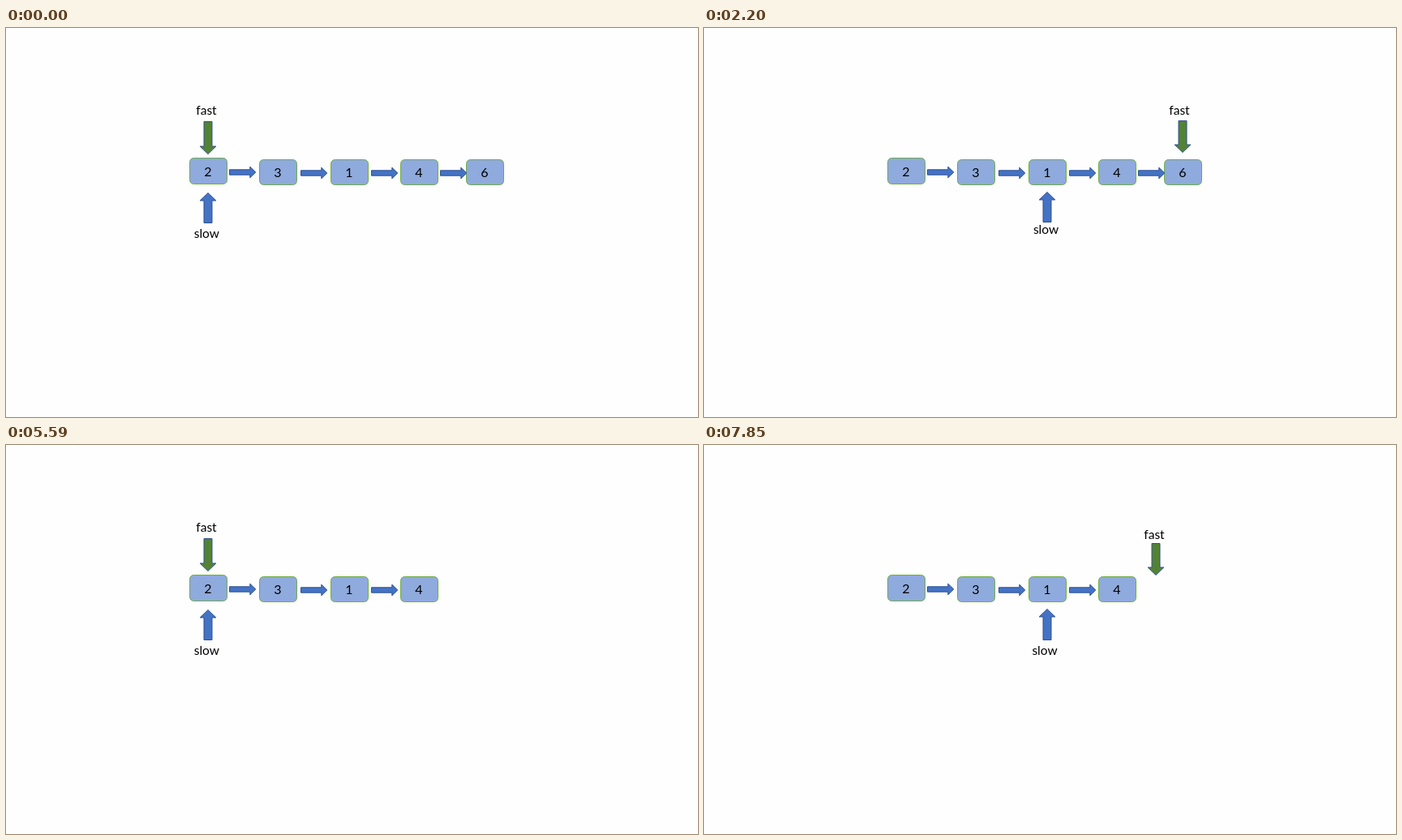
Animation, 853 px wide and 480 px high, one loop 8000 ms. Source, as an HTML page with a canvas:

```html
<!DOCTYPE html>
<html lang="en">
<head>
<meta charset="utf-8">
<title>Fast and slow pointers</title>
<style>
  html, body { margin: 0; width: 100%; height: 100%; overflow: hidden; background: #fefefe; }
  canvas { display: block; width: 853px; height: 480px; }
</style>
</head>
<body>
<canvas id="stage"></canvas>
<script>
const W = 853, H = 480, LOOP = 8000;
const BLUE = '#4472c4', GREEN = '#548235', EDGE = '#2f528f';
const canvas = document.getElementById('stage');
const ctx = canvas.getContext('2d');
const ratio = window.devicePixelRatio || 1;
canvas.width = Math.round(W * ratio);
canvas.height = Math.round(H * ratio);

const nodes = [
  { value: '2', x: 226.5, y: 160.5, h: 32 },
  { value: '3', x: 312.5, y: 162.5, h: 31 },
  { value: '1', x: 400.5, y: 162.5, h: 31 },
  { value: '4', x: 486.5, y: 162.5, h: 31 },
  { value: '6', x: 567.5, y: 162.5, h: 31 }
];
const links = [[275.5, 178], [363.5, 179], [450.5, 179], [535.5, 179]];

// Pointer poses: arrow centre, tail y, tip y, label centre, label baseline
const fastAt = {
  first: [249, 115.5, 155.5, 247, 107],
  third: [423, 114.5, 153.5, 421.3, 107],
  fifth: [590, 114.5, 153.5, 586, 107],
  end: [557, 121.5, 160.5, 555, 116]
};
const slowAt = {
  first: [249, 240.5, 203.5, 247.3, 259],
  second: [336, 240.5, 203.5, 333.5, 258],
  third: [423, 239.5, 202.5, 421.5, 254],
  thirdLow: [423, 240.5, 202.5, 420, 259]
};

const steps = [
  { at: 0, count: 5, fast: fastAt.first, slow: slowAt.first },
  { at: 1070, count: 5, fast: fastAt.third, slow: slowAt.second },
  { at: 2200, count: 5, fast: fastAt.fifth, slow: slowAt.third },
  { at: 3330, count: 5, fast: fastAt.fifth, slow: slowAt.third, middle: 2 },
  { at: 4460, count: 0 },
  { at: 5590, count: 4, fast: fastAt.first, slow: slowAt.first },
  { at: 6720, count: 4, fast: fastAt.third, slow: slowAt.second },
  { at: 7850, count: 4, fast: fastAt.end, slow: slowAt.thirdLow }
];

function label(text, x, y, size) {
  ctx.font = size + 'px Lato, "Noto Sans", sans-serif';
  ctx.textAlign = 'center';
  ctx.fillStyle = '#000';
  ctx.fillText(text, x, y);
}

function paint(fill, stroke) {
  ctx.fillStyle = fill;
  ctx.strokeStyle = stroke;
  ctx.lineWidth = 1;
  ctx.fill();
  ctx.stroke();
}

// Arrow from (x, y) along an angle
function arrow(x, y, angle, length, body, head, headLength, fill) {
  const neck = length - headLength;
  ctx.save();
  ctx.translate(x, y);
  ctx.rotate(angle);
  ctx.beginPath();
  ctx.moveTo(0, -body);
  ctx.lineTo(neck, -body);
  ctx.lineTo(neck, -head);
  ctx.lineTo(length, 0);
  ctx.lineTo(neck, head);
  ctx.lineTo(neck, body);
  ctx.lineTo(0, body);
  ctx.closePath();
  paint(fill, EDGE);
  ctx.restore();
}

function drawNode(node, fill) {
  ctx.beginPath();
  ctx.roundRect(node.x, node.y, 46, node.h, 5);
  paint(fill, '#70ad47');
  label(node.value, node.x + 22.5, node.y + node.h / 2 + 6, 16);
}

function drawPointer(name, [x, tail, tip, textX, textY], fill) {
  const angle = Math.sign(tip - tail) * Math.PI / 2;
  arrow(x, tail, angle, Math.abs(tip - tail), 5, 9.8, 9.5, fill);
  label(name, textX, textY, 15.5);
}

function draw(time) {
  const step = steps.findLast(s => s.at <= time);
  ctx.setTransform(ratio, 0, 0, ratio, 0, 0);
  ctx.fillStyle = '#fefefe';
  ctx.fillRect(0, 0, W, H);
  if (!step.count) return;
  nodes.slice(0, step.count).forEach((node, i) =>
    drawNode(node, i === step.middle ? '#ffd966' : '#8faadc'));
  links.slice(0, step.count - 1).forEach(([x, y]) =>
    arrow(x, y, 0, 32.3, 3.2, 6.8, 7, BLUE));
  drawPointer('fast', step.fast, GREEN);
  drawPointer('slow', step.slow, BLUE);
}

const start = performance.now();
function tick() {
  draw((performance.now() - start) % LOOP);
  requestAnimationFrame(tick);
}
tick();
</script>
</body>
</html>
```
